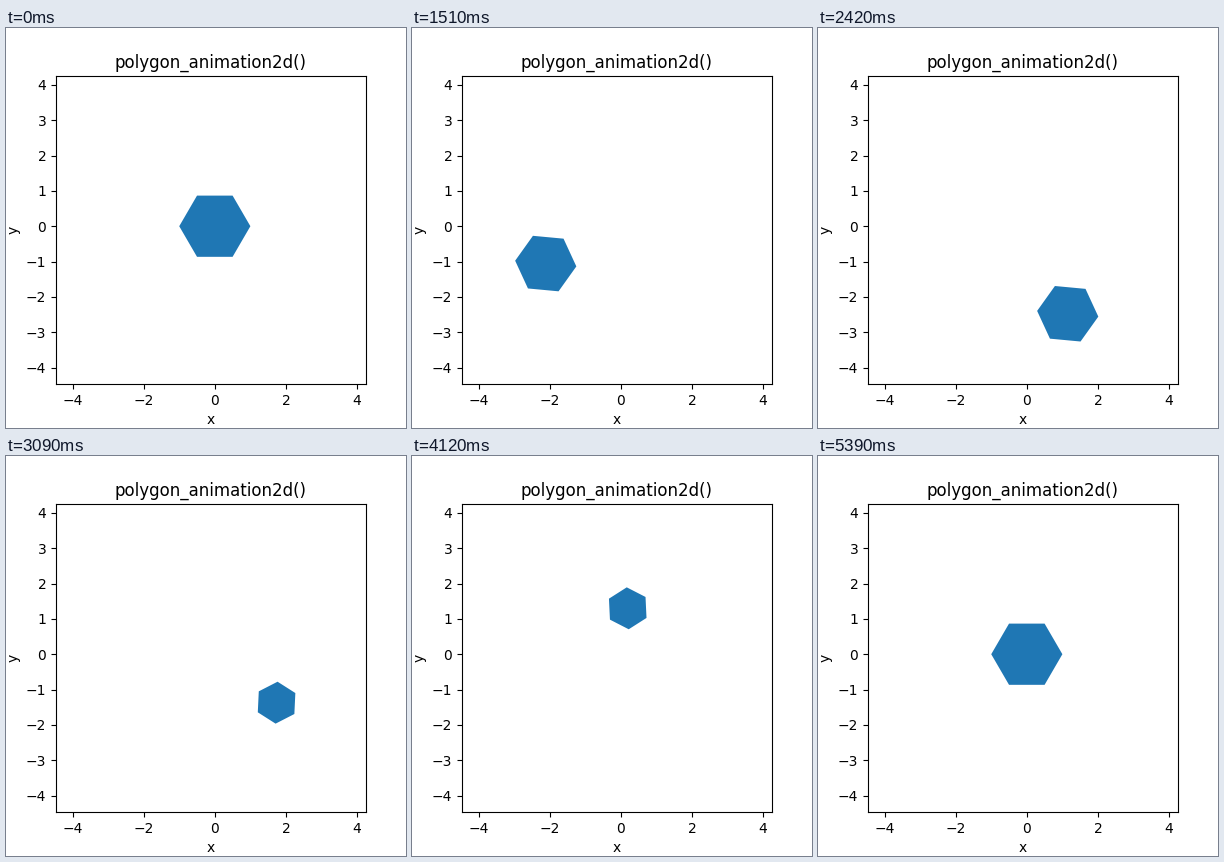
Animation of 400x400 px, one loop 5.45 s. Source, as a matplotlib script:

```python
import numpy as np
import matplotlib.pyplot as plt
from matplotlib.animation import FuncAnimation
from matplotlib.patches import Polygon

LOOP, TICK = 5450, 25        # ms
SEGMENT, STEP = 910, 60      # ms per stretch of the path, ms per pose
LAST = 14                    # last pose index of a stretch

H = np.sqrt(3) / 2
# Centre of the hexagon at each stop, as complex numbers
STOPS = np.array([0, -0.75 + 1.5j * H, -2.25 - 1.5j * H, 1.5 - 3j * H,
                  2.25 + 1.5j * H, -0.75 + 1.5j * H, 0])
HEXAGON = np.exp(1j * np.pi / 3 * np.arange(6))
TURNED = HEXAGON * np.exp(2j * np.pi / 3)


def ease(u):
    """Cubic ease in and out."""
    return 4 * u**3 if u < 0.5 else 1 - 4 * (1 - u)**3


def corners(t):
    """Corners at time t; each one runs straight to its next place."""
    seg, rest = divmod(t, SEGMENT)
    s = ease(min(rest // STEP, LAST) / LAST)
    start = STOPS[seg] + HEXAGON
    end = STOPS[seg + 1] + TURNED
    z = (1 - s) * start + s * end
    return np.column_stack([z.real, z.imag])


fig, ax = plt.subplots(figsize=(4, 4), dpi=100)
limits = (-4 * H - 1, 4.25)
ax.set(xlim=limits, ylim=limits, xlabel="x", ylabel="y",
       title="polygon_animation2d()")
shape = ax.add_patch(Polygon(corners(0), closed=True, facecolor="C0"))


def update(i):
    # Sample late in the tick so that poses change on time
    shape.set_xy(corners(i * TICK + 20))
    return [shape]


anim = FuncAnimation(fig, update, frames=LOOP // TICK, interval=TICK,
                     repeat=True, repeat_delay=0)
plt.show()
```
